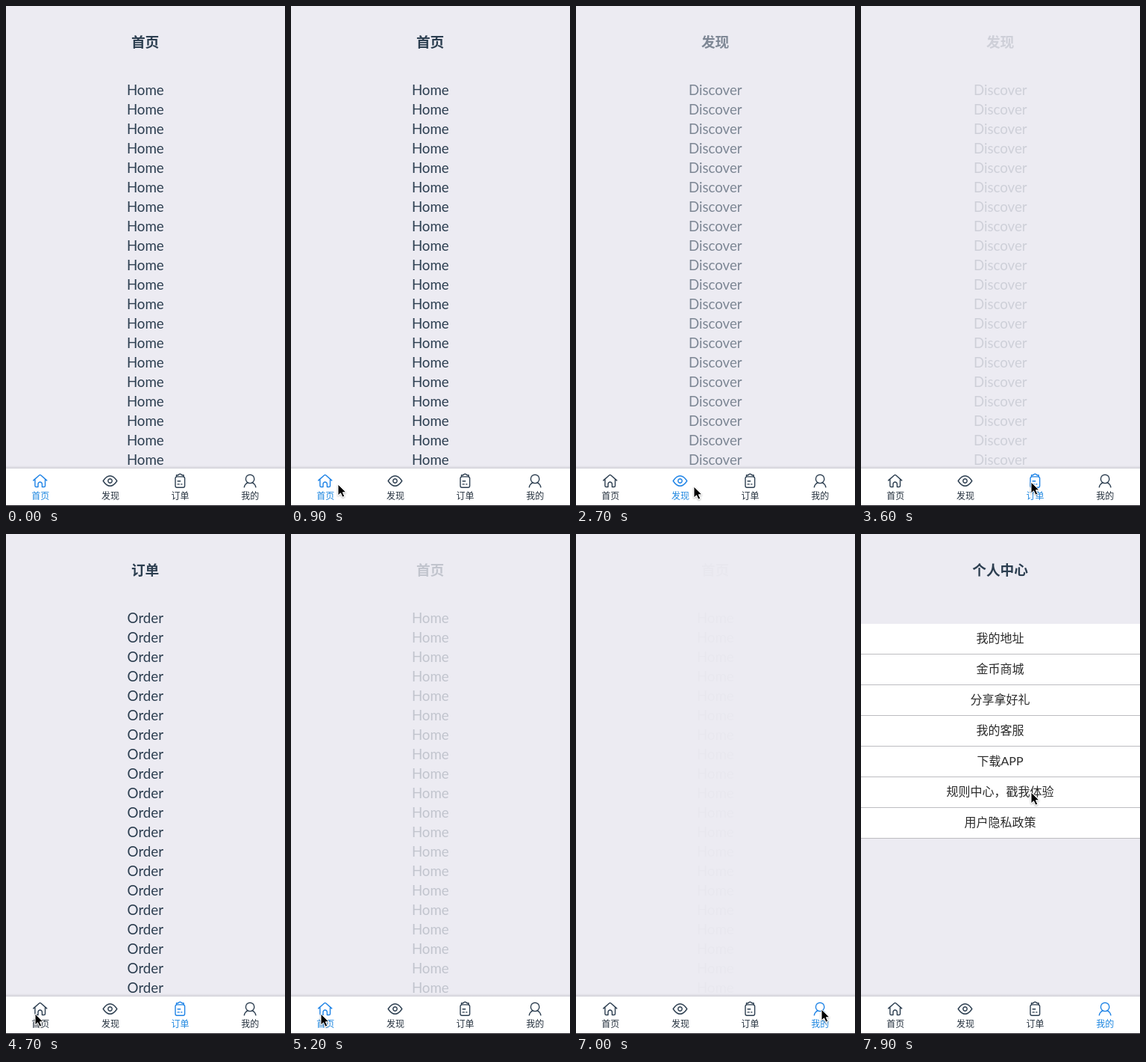
Write an HTML page that moves like this. It is 374x668 px and loops after 8000 ms.

```html
<!DOCTYPE html>
<html lang="zh-CN">
<head>
<meta charset="utf-8">
<title>Tab bar</title>
<style>
  html, body { margin: 0; width: 100%; height: 100%; overflow: hidden; background: #ecebf2; }
  svg { display: block; width: 100%; height: 100%; }
  text { font-family: Lato, "Noto Sans CJK SC", "Noto Sans CJK", sans-serif; text-anchor: middle; fill: #2c3e50; }
  .title { font-size: 18.72px; font-weight: 700; }
  .word { font-size: 18.7px; }
  .item { font-size: 16px; fill: #2b2b2b; }
  .tab text { font-size: 12px; fill: #26323f; }
  .tab path { fill: none; stroke: #2c3e50; stroke-width: 1.4; stroke-linecap: round; stroke-linejoin: round; }
  .tab.on text { fill: #1e87e0; }
  .tab.on path { stroke: #1e83e6; }
</style>
</head>
<body>
<svg id="stage" viewBox="0 0 374 668">
  <defs>
    <linearGradient id="shade" x1="0" y1="0" x2="0" y2="1">
      <stop offset="0" stop-color="#000" stop-opacity="0"/>
      <stop offset="1" stop-color="#000" stop-opacity=".11"/>
    </linearGradient>
    <filter id="soft" x="-50%" y="-50%" width="200%" height="200%">
      <feDropShadow dx="0" dy="1" stdDeviation="1" flood-opacity=".35"/>
    </filter>
  </defs>
  <rect width="374" height="668" fill="#ecebf2"/>
  <g id="pages"></g>
  <rect y="614" width="374" height="4" fill="url(#shade)"/>
  <rect y="618" width="374" height="50" fill="#fff"/>
  <g id="tabs"></g>
  <rect y="667" width="374" height="1" fill="#1f1d24"/>
  <path id="cursor" d="M0 0V15L3.5 11.8L6 17.2L8.8 16L6.4 10.8H11Z" fill="#000" stroke="#fff" stroke-width="1" filter="url(#soft)"/>
</svg>
<script>
const LOOP = 8000, TICK = 100, FADE = 300;
const NS = "http://www.w3.org/2000/svg";
const $ = id => document.getElementById(id);

function add(parent, tag, attrs, text) {
  const el = document.createElementNS(NS, tag);
  for (const k in attrs) el.setAttribute(k, attrs[k]);
  if (text) el.textContent = text;
  parent.appendChild(el);
  return el;
}

const tabs = [
  ["首页", "M-9-.6L-.9-7.7Q0-8.4.9-7.7L9-.6M-6.8-2.2V6.4Q-6.8 8-5.2 8H-2.7V4.2A2.7 2.7 0 0 1 2.7 4.2V8H5.2Q6.8 8 6.8 6.4V-2.2"],
  ["发现", "M-9.3 0C-6-5-3-6.8 0-6.8S6-5 9.3 0C6 5 3 6.8 0 6.8S-6 5-9.3 0ZM-2.7 0A2.7 2.7 0 1 1 2.7 0A2.7 2.7 0 1 1-2.7 0Z"],
  ["订单", "M-4-5.6H4Q6.3-5.6 6.3-3.4V6.6Q6.3 8.8 4.1 8.8H-4.1Q-6.3 8.8-6.3 6.6V-3.4Q-6.3-5.6-4-5.6ZM-4.8-5.8V-7.8H-2.4Q-1.6-9.2 0-9.2T2.4-7.8H4.8V-5.8M-3.2 .3H.4M-3.2 4.4H-1M1.4 4.4H2.6"],
  ["我的", "M-5.7-2.6A5.7 5.7 0 1 1 5.7-2.6A5.7 5.7 0 1 1-5.7-2.6ZM-3.4 2.3Q-7 4.2-7.8 8.3M3.4 2.3Q7 4.2 7.8 8.3"]
].map(([label, d], i) => {
  const g = add($("tabs"), "g", { class: "tab" });
  add(g, "path", { d, transform: `translate(${45.7 + 93.8 * i} 634.5)` });
  add(g, "text", { x: 46.2 + 93.7 * i, y: 659.4 }, label);
  return g;
});

function makePage(title) {
  const g = add($("pages"), "g", {});
  add(g, "text", { class: "title", x: 186.6, y: 55.4 }, title);
  return g;
}

function wordPage(title, word) {
  const g = makePage(title);
  for (let i = 0; i < 20; i++) add(g, "text", { class: "word", x: 186.8, y: 119.4 + 26 * i }, word);
  return g;
}

function listPage(title, items) {
  const g = makePage(title);
  items.forEach((item, i) => {
    const y = 120 + 41 * i;
    add(g, "rect", { y, width: 374, height: 40, fill: "#fff" });
    add(g, "rect", { y: y + 40, width: 374, height: 1, fill: "#bdbdc1" });
    add(g, "text", { class: "item", x: 186.5, y: y + 24.8 }, item);
  });
  return g;
}

const pages = [
  wordPage("首页", "Home"),
  wordPage("发现", "Discover"),
  wordPage("订单", "Order"),
  listPage("个人中心", ["我的地址", "金币商城", "分享拿好礼", "我的客服", "下载APP", "规则中心，戳我体验", "用户隐私政策"])
];

// page, click time, start of fade in, start of fade out
const visits = [
  [0, 0, -FADE, 2250],
  [1, 2300, 2600, 3435],
  [2, 3500, 3735, 4850],
  [0, 4900, 5150, 6750],
  [3, 6800, 7050, LOOP]
];

// time, x, y of the pointer tip
const moves = [
  [100, 150, 585], [900, 63, 639], [1500, 63, 639], [2100, 138, 641],
  [2600, 138, 641], [2700, 158, 642], [3300, 229, 637], [3600, 228, 636],
  [3900, 284, 640], [4300, 228, 636], [4700, 39, 641], [5200, 40, 641],
  [5700, 236, 641], [5800, 312, 655], [5900, 312, 655], [6200, 340, 651],
  [6300, 340, 651], [6600, 329, 635], [7200, 329, 635], [7600, 320, 620],
  [7800, 190, 333], [7900, 228, 345]
];

const clamp = v => Math.min(1, Math.max(0, v));
const smooth = p => p * p * (3 - 2 * p);

// CSS "ease": cubic-bezier(.25, .1, .25, 1)
function ease(x) {
  x = clamp(x);
  let lo = 0, hi = 1, s = x;
  for (let i = 0; i < 20; i++) {
    s = (lo + hi) / 2;
    const bx = .75 * s * (1 - s) + s ** 3;
    if (bx < x) lo = s; else hi = s;
  }
  return .3 * s * (1 - s) ** 2 + 3 * s * s * (1 - s) + s ** 3;
}

function pointer(t) {
  const i = moves.findIndex(m => m[0] >= t);
  if (i < 0) return moves[moves.length - 1].slice(1);
  if (i === 0) return moves[0].slice(1);
  const [t0, x0, y0] = moves[i - 1], [t1, x1, y1] = moves[i];
  const p = smooth((t - t0) / (t1 - t0));
  return [x0 + (x1 - x0) * p, y0 + (y1 - y0) * p];
}

function draw(t) {
  const alpha = [0, 0, 0, 0];
  let active = 0;
  for (const [page, click, start, end] of visits) {
    if (t >= click) active = page;
    alpha[page] += ease((t - start) / FADE) * (1 - ease((t - end) / FADE));
  }
  pages.forEach((g, i) => {
    g.setAttribute("opacity", clamp(alpha[i]).toFixed(3));
    g.setAttribute("display", alpha[i] > .002 ? "inline" : "none");
  });
  tabs.forEach((g, i) => g.classList.toggle("on", i === active));
  const [x, y] = pointer(t);
  $("cursor").setAttribute("transform", `translate(${x.toFixed(1)} ${y.toFixed(1)})`);
  $("cursor").setAttribute("display", t < moves[0][0] ? "none" : "inline");
}

// The screen updates ten times a second.
const begin = performance.now();
function frame() {
  const t = (performance.now() - begin) % LOOP;
  draw(Math.floor(t / TICK) * TICK);
  requestAnimationFrame(frame);
}
frame();
</script>
</body>
</html>
```
